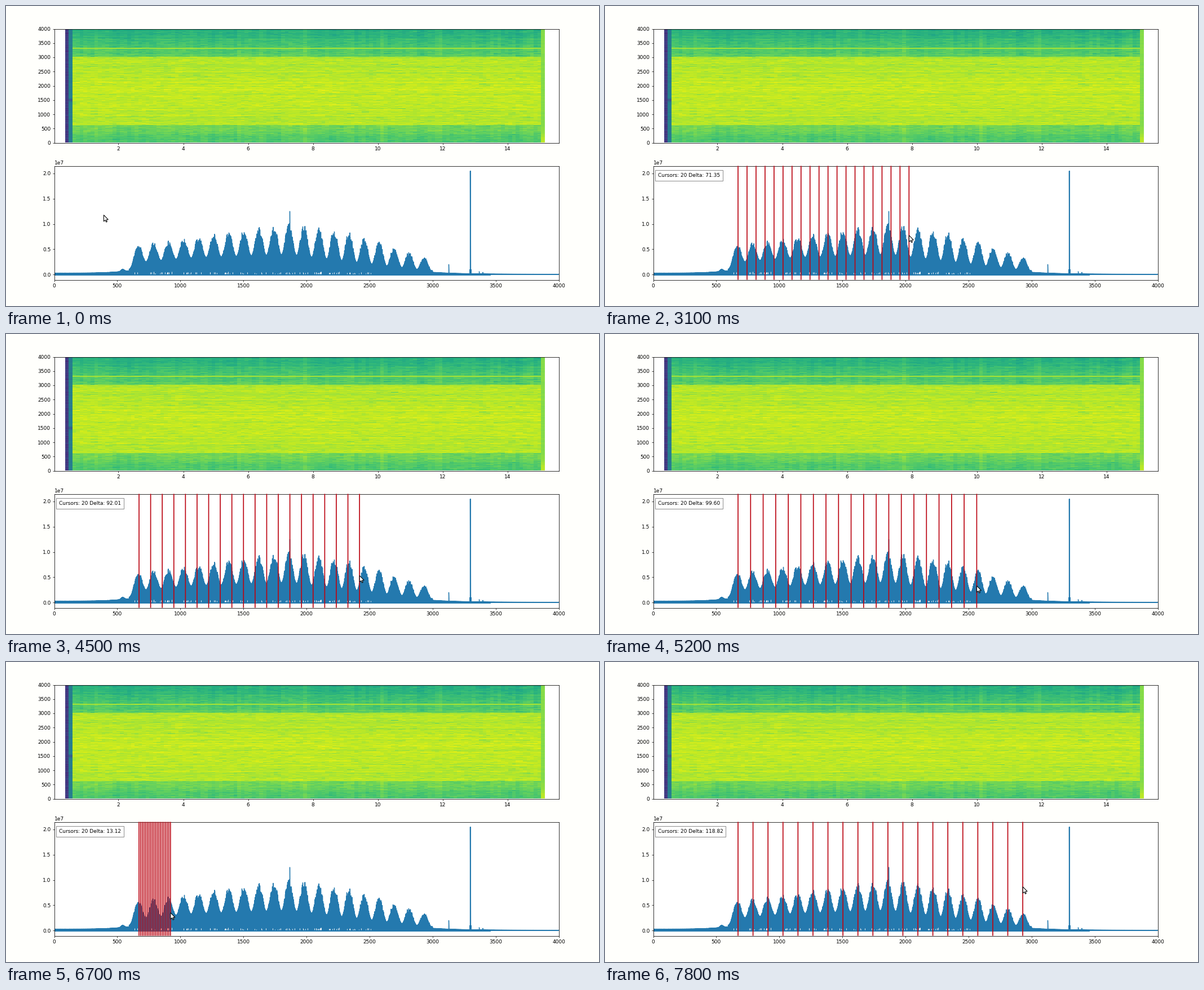
A matplotlib script for the animation above (8000 ms loop, 1052 by 532 pixels).

```python
import numpy as np
import matplotlib.pyplot as plt
from matplotlib.animation import FuncAnimation
from matplotlib.collections import LineCollection
from matplotlib.patches import Polygon

W, H, DPI = 1052, 532, 64
LEFT, RIGHT = 85.5, 980.5
TOP_AXES, BOTTOM_AXES = (40.5, 242.5), (283.5, 485.5)
PX_PER_HZ = (RIGHT - LEFT) / 4000
FIRST_CURSOR, CURSORS = 236.0, 20
BLUE, RED = "#2479ae", "#bb0512"
STEP_MS, LOOP_MS, LABEL_MS = 100, 8000, 2400

plt.rcParams.update({
    "font.family": "DejaVu Sans", "font.size": 10.14,
    "axes.linewidth": 0.9, "path.simplify": False,
})
rng = np.random.default_rng(7)
fig = plt.figure(figsize=(W / DPI, H / DPI), dpi=DPI, facecolor="#fffffc")


def add_panel(span):
    top, bottom = span
    return fig.add_axes([LEFT / W, 1 - bottom / H, (RIGHT - LEFT) / W, (bottom - top) / H])


def to_hz(px):
    return (np.asarray(px) - LEFT) / PX_PER_HZ


def bell(x, center, width):
    return np.exp(-((x - center) / width) ** 2)


def draw_spectrogram(ax):
    rows, cols = 202, 131
    hz = (np.arange(rows) + 0.5) * 4000 / rows
    in_band = (hz > 620) & (hz < 3005)
    level = np.select(
        [in_band, hz < 1000],
        [0.87 + 0.035 * np.sin(np.pi * (hz - 600) / 2400), 0.71 + 0.08 * hz / 600],
        0.76 - 0.16 * (hz - 3000) / 1000)
    noise = np.log(rng.gamma(3, 1 / 3, (rows, cols + 1)))
    noise = 0.7 * noise[:, 1:] + 0.45 * noise[:, :-1]
    image = level[:, None] + 0.01 + 0.042 * noise + rng.normal(0, 0.013, (rows, 1))
    image += rng.normal(0, 0.013, cols) * ~in_band[:, None]
    tone = np.abs(hz - 3307) < 20
    image[tone] = 0.87 + 0.01 * noise[tone]
    image[:, 0] = 0.18 + 0.05 * noise[:, 0]
    image[:, 1] = 0.43 + 0.03 * noise[:, 1] - 0.16 * bell(hz, 1490, 45)
    image[:, -1] = 0.82 + 0.09 * bell(hz, 0, 300) + 0.015 * noise[:, -1]

    colors = plt.get_cmap("viridis")(np.clip(image, 0, 1))
    colors[..., 1] *= 1 + 0.06 * np.clip(image, 0, 1) ** 3

    def seconds(px):
        return 2 + (px - 199.4) / 57.55

    ax.imshow(np.clip(colors, 0, 1), origin="lower", aspect="auto", interpolation="nearest",
              extent=(seconds(105), seconds(955.5), 0, 4000))
    ax.set(xlim=(seconds(LEFT), seconds(RIGHT)), ylim=(0, 4000),
           xticks=range(2, 15, 2), yticks=range(0, 4001, 500))


def draw_spectrum(ax):
    first, last, period = 218, 757, 26.7
    px = np.arange(LEFT, RIGHT, 0.5)
    crest = np.interp(px, [235, 500, 610, 745], [5.9, 10.2, 8.6, 3.3])
    valley = np.interp(px, [222, 326, 500, 757], [2.3, 3.3, 4.0, 0.7])
    lobe = 1 - np.abs(np.sin(np.pi * (px - 235) / period)) ** 2.3
    edges = np.clip((px - 214) / 12, 0, 1) * np.clip((762 - px) / 10, 0, 1)
    rough = 0.72 + 0.28 * rng.random(px.size) ** 1.6
    comb = (valley + (crest - valley) * lobe * rough) * edges
    floor = np.where(px < 400,
                     0.32 + 0.5 * (to_hz(px) / 600) ** 4 + 0.45 * bell(px, 207, 4),
                     0.08 + 0.4 * np.exp(-(px - last) / 50))
    envelope = np.where((px > first) & (px < last), np.maximum(comb, 0.8),
                        floor * (0.8 + 0.2 * rough))
    for x, height in [(503.5, 12.5), (785.5, 2), (839.5, 0.6), (846, 0.45),
                      (823, 1), (823.5, 20.46), (824, 20.46), (825, 1)]:
        envelope[np.argmin(np.abs(px - x))] = height
    low = np.where(px < 860, -0.08, 0)
    ax.plot(np.repeat(to_hz(px), 2), np.column_stack([low, envelope]).ravel() * 1e6,
            color=BLUE, lw=1.5)

    # Small white gaps just above the base line
    gaps = 235 + period * rng.integers(0, 16, 110) + rng.normal(0, 6, 110)
    ax.vlines(to_hz(gaps), 0.13e6, rng.uniform(0.25, 0.55, 110) * 1e6,
              color="white", lw=1, zorder=3)
    ax.set(xlim=(0, 4000), ylim=(-0.1023e7, 2.148e7), xticks=range(0, 4001, 500),
           yticks=np.arange(0, 2.1e7, 0.5e7))


draw_spectrogram(add_panel(TOP_AXES))
draw_spectrum(add_panel(BOTTOM_AXES))

# Transparent layer in stage pixels for everything that moves
stage = fig.add_axes([0, 0, 1, 1], xlim=(0, W), ylim=(H, 0))
stage.axis("off")
cursors = LineCollection([], colors=RED, linewidths=1.9)
cursors.set_snap(False)
stage.add_collection(cursors, autolim=False)
label = stage.text(94, 296, "", va="top", ha="left",
                   bbox=dict(boxstyle="square,pad=0.5", fc="white", ec="black", alpha=0.5, lw=1))
ARROW = np.array([(0.4, 0.6), (0.4, 12), (3, 9.7), (4.8, 13.2), (6.4, 12.5), (4.8, 9.1), (8.3, 8.8)])
pointer = stage.add_patch(Polygon(ARROW, fc="white", ec="black", lw=1.2, zorder=5))

# Turning points of the hand: (ms, value)
APPROACH_X = [(900, 173), (1200, 216), (1300, 216), (1600, 235)]
APPROACH_Y = [(900, 370), (1200, 381), (1300, 381), (1600, 394), (1900, 394), (2000, 395)]
DRAG_Y = [(2400, 399), (4000, 416), (5200, 446), (6000, 440), (6700, 444), (7800, 398)]
SPACING_HZ = [
    (2400, 7.47), (3000, 76.9), (3400, 48.9), (3500, 48.9), (3700, 52.7), (3900, 52.7),
    (4000, 64.52), (5000, 119.5), (5100, 119.5), (5200, 99.60), (5500, 70), (6000, 121.41),
    (6100, 122.1), (6700, 13.12), (6900, 4), (7500, 118.1), (7600, 118.1), (7800, 118.82)]


def glide(keys, ms):
    """Value at ms, halfway between a linear and a cosine ease from key to key."""
    times, values = np.array(keys).T
    ms = np.clip(ms, times[0], times[-1])
    i = min(np.searchsorted(times, ms, side="right"), len(times) - 1)
    t = (ms - times[i - 1]) / (times[i] - times[i - 1])
    t = (t + (1 - np.cos(np.pi * t)) / 2) / 2
    return values[i - 1] + (values[i] - values[i - 1]) * t


def update(frame):
    ms = frame * STEP_MS
    dragging = ms >= LABEL_MS
    if dragging:
        delta = glide(SPACING_HZ, ms)
        xs = FIRST_CURSOR + np.arange(CURSORS) * delta * PX_PER_HZ
        x, y = xs[-1] - 0.3, glide(DRAG_Y, ms)
        cursors.set_segments([[(c, BOTTOM_AXES[0]), (c, BOTTOM_AXES[1])] for c in xs])
        label.set_text(f"Cursors: {CURSORS} Delta: {delta:.2f}")
    else:
        x, y = glide(APPROACH_X, ms), glide(APPROACH_Y, ms)
        cursors.set_segments([])
    label.set_visible(dragging)
    pointer.set_xy(ARROW + (x, y))
    return cursors, label, pointer


anim = FuncAnimation(fig, update, frames=LOOP_MS // STEP_MS, interval=STEP_MS,
                     repeat=True, repeat_delay=0, blit=False)
plt.show()
```
